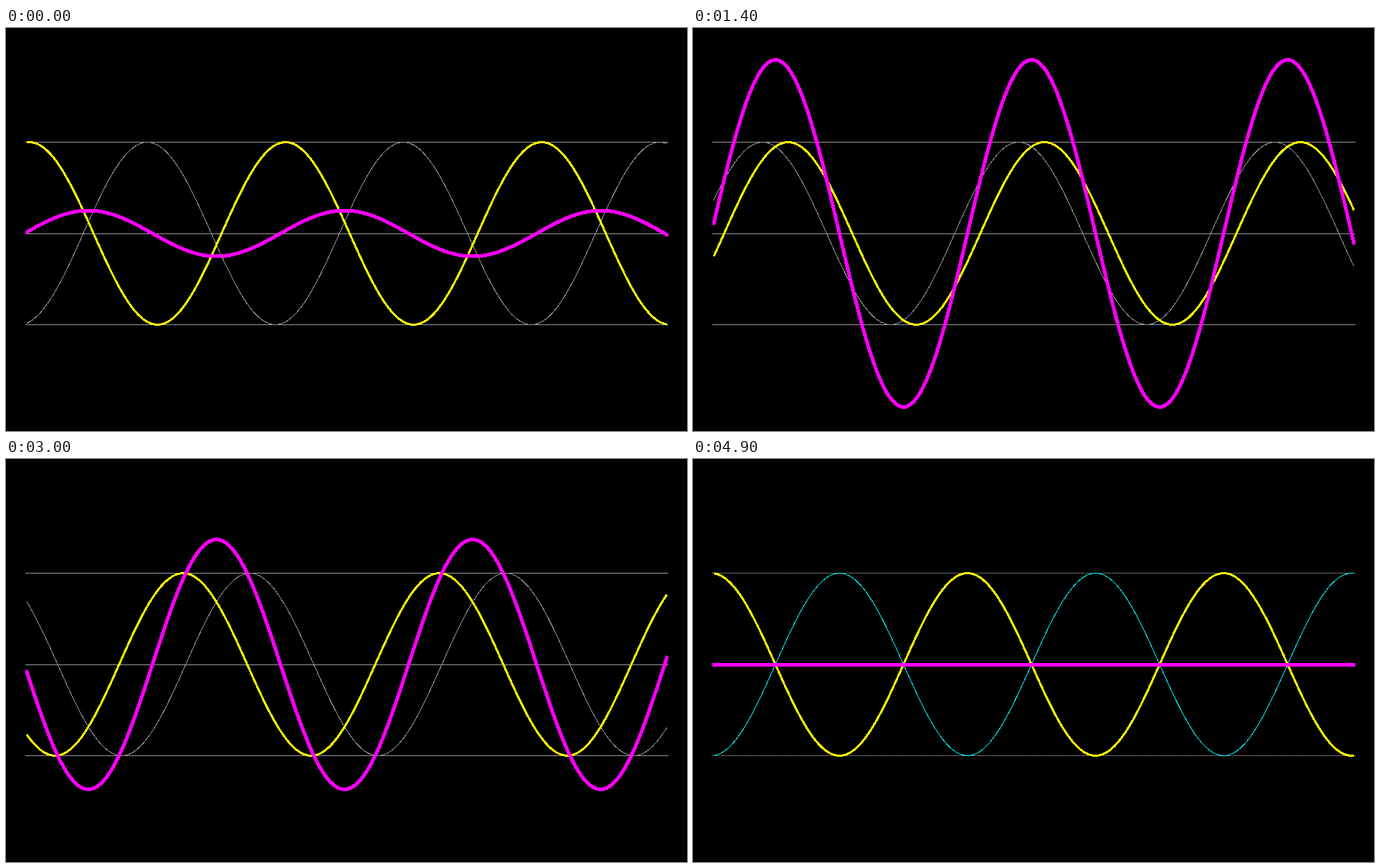
Animation, 950 px wide and 563 px high, one loop 5000 ms. Source, as an HTML page:

```html
<!DOCTYPE html>
<html lang="en">
<head>
<meta charset="utf-8">
<title>Standing wave</title>
<style>
  html, body { margin: 0; width: 100%; height: 100%; overflow: hidden; background: #000; }
  svg { display: block; }
  path { fill: none; shape-rendering: crispEdges; }
</style>
</head>
<body>
<svg width="950" height="563" viewBox="0 0 950 563">
  <clipPath id="plot"><rect x="27" y="32" width="897" height="510"/></clipPath>
  <g clip-path="url(#plot)">
    <path id="limits" d="M27 159.5H924M27 414.5H924"/>
    <path d="M27 287.5H924" stroke="#999"/>
    <path id="left" stroke-width="1"/>
    <path id="right" stroke="#ff0" stroke-width="3" stroke-linejoin="round"/>
    <path id="sum" stroke="#f0f" stroke-width="5" stroke-linecap="square" stroke-linejoin="round"/>
  </g>
</svg>
<script>
const STEPS = 50, STEP_MS = 100;
const X0 = 29, X1 = 922, MID = 287, AMP = 127.5;
const LENGTH = 357.3, NODE = 472.25;
const K = 2 * Math.PI / LENGTH;

const [limits, left, right, sum] =
  ["limits", "left", "right", "sum"].map(id => document.getElementById(id));

function curve(f) {
  const points = [];
  for (let x = X0; x <= X1; x += 4.7) points.push(x);
  points.push(X1);
  return "M" + points.map(x => x.toFixed(2) + " " + (MID - f(x)).toFixed(2)).join("L");
}

function draw(time) {
  const step = Math.floor(time / STEP_MS) % STEPS;
  const phase = 2 * Math.PI * (step + 1) / STEPS;
  const toRight = x => -AMP * Math.sin(K * (x - NODE) - phase);
  const toLeft = x => AMP * Math.sin(K * (x - NODE) + phase);

  right.setAttribute("d", curve(toRight));
  left.setAttribute("d", curve(toLeft));
  sum.setAttribute("d", curve(x => toRight(x) + toLeft(x)));

  // The waves cancel twice per loop; the thin lines change colour there.
  const flat = (step + 1) % (STEPS / 2) === 0;
  left.setAttribute("stroke", flat ? "#0ff" : "#999");
  limits.setAttribute("stroke", flat ? "#ccc" : "#999");
  limits.setAttribute("stroke-dasharray", flat ? "1 1" : "none");
}

function tick() {
  draw(performance.now());
  requestAnimationFrame(tick);
}
tick();
</script>
</body>
</html>
```
